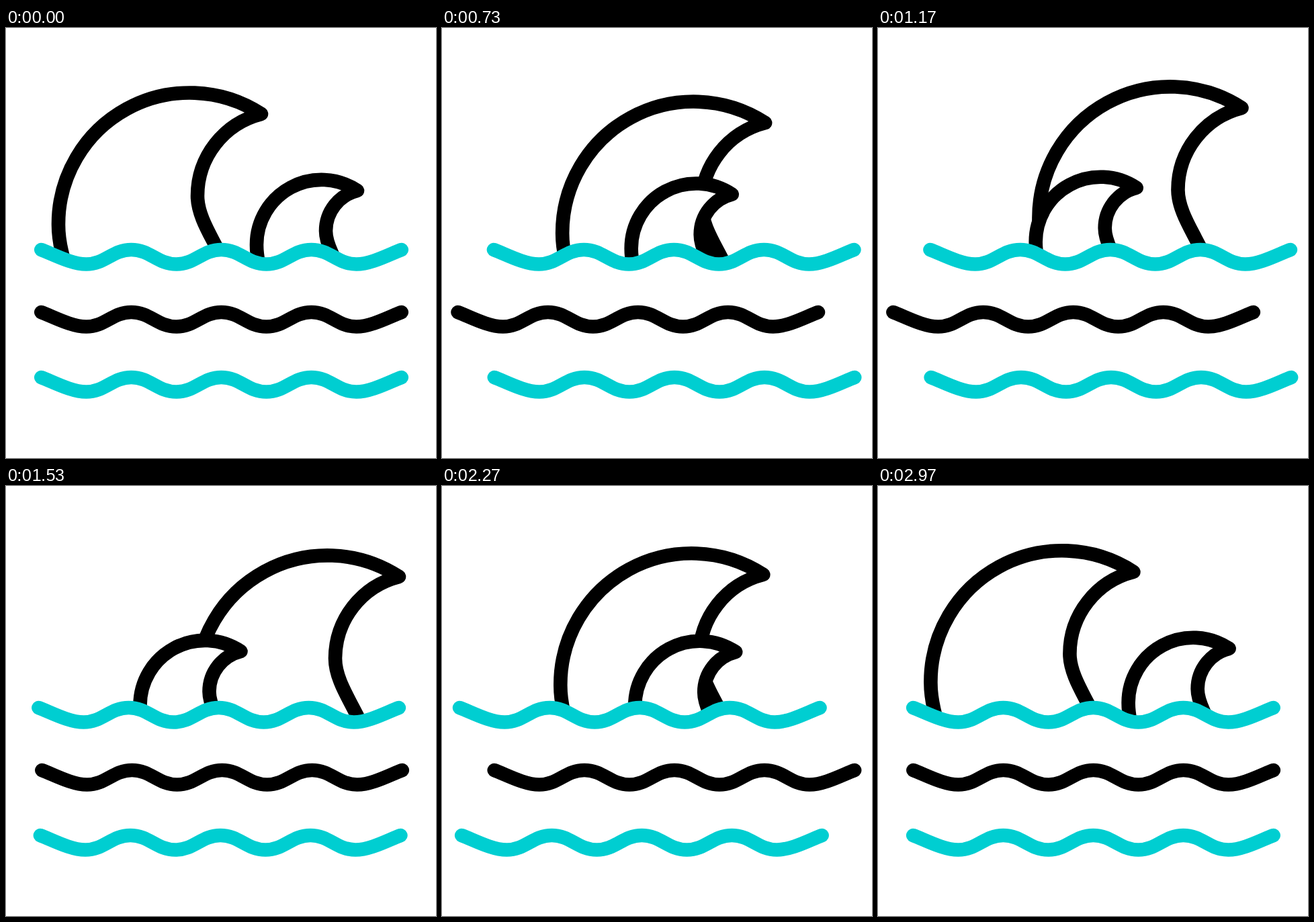
These frames come from a looping animation (640 by 640 pixels, 3 s). An HTML page:

```html
<!DOCTYPE html>
<html lang="en">
<head>
<meta charset="utf-8">
<title>Waves</title>
<style>
  html, body { margin: 0; width: 100%; height: 100%; overflow: hidden; background: #fff; }
  svg { display: block; width: 100vw; height: 100vh; }
  .line { stroke-width: 20.6; stroke-linecap: round; stroke-linejoin: round; }
  .fin { fill: #fff; stroke: #000; }
  .wave { fill: none; stroke: #00ced1; }
  .dark { stroke: #000; }
</style>
</head>
<body>
<svg viewBox="0 0 640 640">
  <path id="big" class="line fin" d="M92 370 L83 333 C80 320 78 307 78 293 A195.5 195.5 0 0 1 380 128 A125.8 125.8 0 0 0 285 250 C285 275 300 301 311 322 L335 368"/>
  <path id="small" class="line fin" d="M380 370 L376 350 C374 340 373 335 373 323 A96.6 96.6 0 0 1 523 242 A61.8 61.8 0 0 0 476 302 C476 314 480 324 485 335 L499 365"/>
  <g id="top"><path id="mask" fill="#fff"/><path class="line wave"/></g>
  <g id="middle"><path class="line wave dark"/></g>
  <g id="bottom"><path class="line wave"/></g>
</svg>
<script>
const LOOP = 3000;
const $ = id => document.getElementById(id);
const ease = t => t * t * (3 - 2 * t);

// One wave line: two tapered ends and six half swells between them.
function waveLine(y) {
  const low = y + 21.5, half = 67, pull = 28;
  let d = `M52.3 ${y} C70 ${y + 6.5} 97 ${low} 119.5 ${low}`;
  for (let i = 0; i < 6; i++) {
    const x = 119.5 + i * half;
    const [from, to] = i % 2 ? [y, low] : [low, y];
    d += ` C${x + pull} ${from} ${x + half - pull} ${to} ${x + half} ${to}`;
  }
  return d + ` C544 ${low} 571 ${y + 6.5} 588.7 ${y}`;
}

// Sideways shift of each wave at 0, 1, 2 and 3 s.
const waves = [
  { id: 'top', y: 330, shift: [0, 30, -32, 0] },
  { id: 'middle', y: 423, shift: [0, -35, 31, 0] },
  { id: 'bottom', y: 520, shift: [0, 31, -28.2, 0] }
];
for (const w of waves) {
  w.el = $(w.id);
  w.el.querySelector('.wave').setAttribute('d', waveLine(w.y));
}
$('mask').setAttribute('d', waveLine(330) + ' V412 H52.3 Z');

// Each fin swims round a closed path, easing along every leg.
const times = [0, 750, 1535, 2250, LOOP];
const fins = [
  { id: 'big', legs: [
    'M0 0 C28 29.5 68 37 101.3 13',
    'M101.3 13 C134 -11 205 -21 205 7',
    'M205 7 C205 29 132 21 98.5 4',
    'M98.5 4 C65 -15 33 -15 0 0'] },
  { id: 'small', legs: [
    'M0 0 C-32 21.5 -62 18 -91.5 5.5',
    'M-91.5 5.5 C-121 -6 -173.5 -9 -173.5 4',
    'M-173.5 4 C-173.5 17 -114 15 -86 5',
    'M-86 5 C-58 -6 -29 -7 0 0'] }
];
for (const f of fins) {
  f.el = $(f.id);
  f.legs = f.legs.map(d => {
    const path = document.createElementNS('http://www.w3.org/2000/svg', 'path');
    path.setAttribute('d', d);
    return { path, length: path.getTotalLength() };
  });
}

const move = (el, x, y) => el.setAttribute('transform', `translate(${x.toFixed(2)} ${y.toFixed(2)})`);

function draw() {
  const t = performance.now() % LOOP;

  const k = Math.floor(t / 1000);
  const p = ease(t / 1000 - k);
  for (const { el, shift } of waves) move(el, shift[k] + (shift[k + 1] - shift[k]) * p, 0);

  let leg = 0;
  while (t >= times[leg + 1]) leg++;
  const s = ease((t - times[leg]) / (times[leg + 1] - times[leg]));
  for (const f of fins) {
    const { path, length } = f.legs[leg];
    const pos = path.getPointAtLength(length * s);
    move(f.el, pos.x, pos.y);
  }
  requestAnimationFrame(draw);
}
draw();
</script>
</body>
</html>
```
